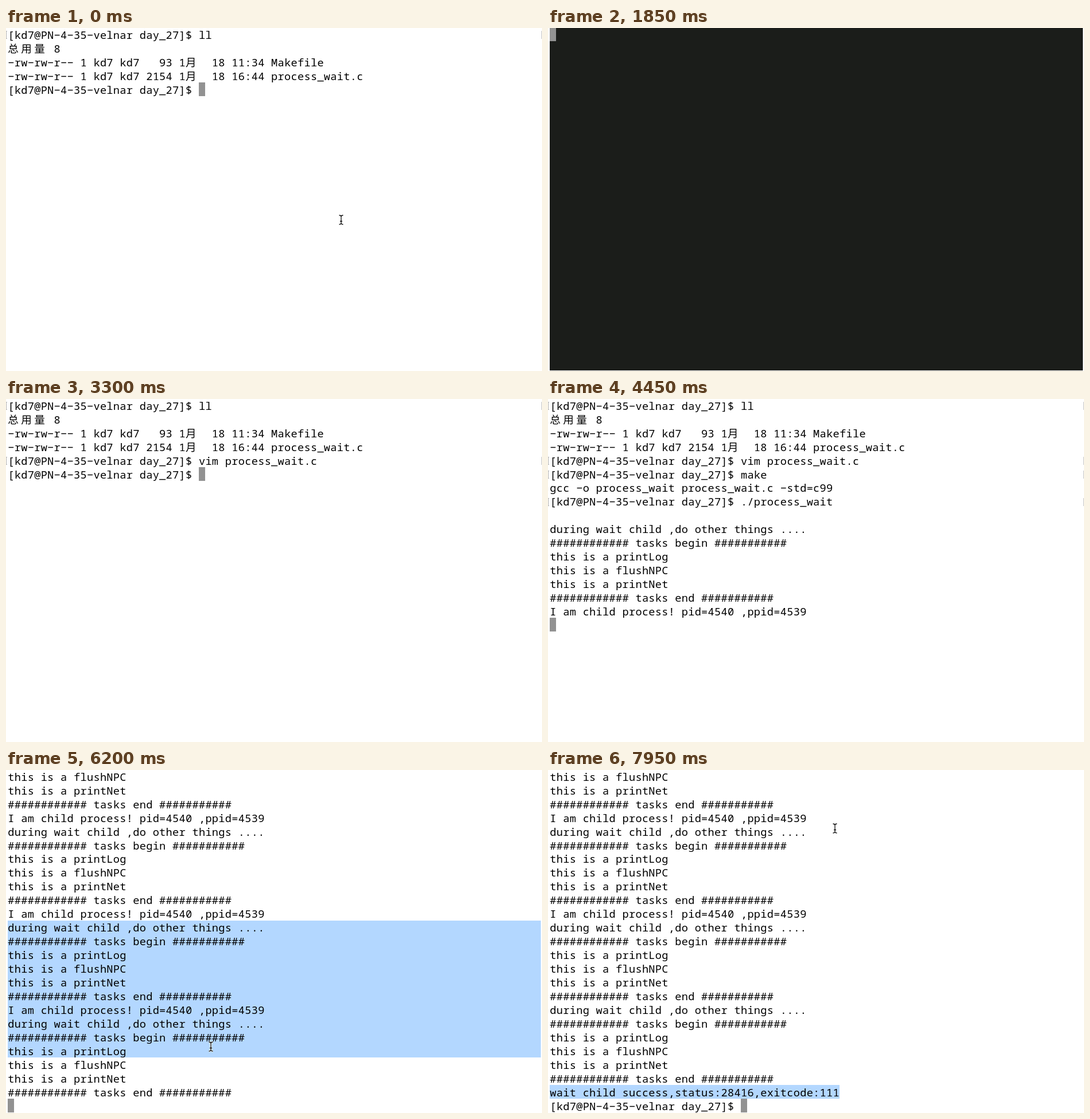
Animation of 934x599 px, one loop 8 s. Source, as an HTML page with a canvas:

```html
<!DOCTYPE html>
<html lang="zh">
<head>
<meta charset="utf-8">
<title>Terminal session</title>
<style>
html, body { margin: 0; width: 100%; height: 100%; overflow: hidden; background: #fff; }
canvas { display: block; }
</style>
</head>
<body>
<canvas id="stage" width="934" height="599"></canvas>
<script>
const ctx = document.getElementById('stage').getContext('2d');
const LOOP = 8000, TICK = 50;
const X0 = 3.3, CW = 11.47, RH = 23.96, COLS = 81, ROWS = 25;
const FONT = '18.6px "Noto Sans Mono", "Noto Sans CJK SC", "Noto Sans CJK", monospace';
const GREY = '#929292', DARK = '#1b1d1a', BLUE = '#6688ff', GREEN = '#66ff66';
const PINK = '#ff5f87', YELLOW = '#dcdc32', TEAL = '#26b3b3', SKY = '#5fafd7',
      LEMON = '#ffff87', COMMENT = '#1edc1e', PLAIN = '#ececec';

const colX = c => X0 + c * CW;
const rowY = r => Math.round(r * RH - 1);
const cells = ch => /[\u3000-\u9fff\uff00-\uffef]/.test(ch) ? 2 : 1;

function fill(color, x0, y0, x1, y1) {
  ctx.fillStyle = color;
  ctx.fillRect(x0, y0, x1 - x0, y1 - y0);
}

function block(color, c0, c1, row) {
  fill(color, Math.round(colX(c0) - .3), Math.max(0, rowY(row)), Math.round(colX(c1) - .3), rowY(row + 1));
}

function put(text, col, row, color, bold) {
  ctx.font = (bold ? '700 ' : '500 ') + FONT;
  ctx.fillStyle = color;
  for (const ch of text) {
    if (ch !== ' ') ctx.fillText(ch === '-' ? '\u2212' : ch, colX(col), row * RH + 18.7);
    col += cells(ch);
  }
}

// Last value whose time has come
function at(t, steps) {
  let value = '';
  for (const [time, v] of steps) if (t >= time) value = v;
  return value;
}

// ---------- editor ----------
const code = String.raw`
#include <stdio.h>
#include <stdlib.h>
#include <unistd.h>
#include <sys/types.h>
#include <sys/wait.h>

#define TASK_NUM 5

typedef void (*task_t)();

task_t tasks[TASK_NUM];

void printLog(){
    printf("this is a printLog\n");
}

void printNet(){
    printf("this is a printNet\n");
}

void flushNPC(){
    printf("this is a flushNPC\n");
}

void initTasks(){
    tasks[0] = printLog;
    tasks[1] = flushNPC;
    tasks[2] = printNet;
    tasks[3] = NULL;
}

void executeTasks(){
    for(int i = 0; tasks[i]; i++){
        tasks[i]();
    }
}

int main(){
    initTasks();
    pid_t id = fork();
    if(id < 0){
        perror("fork error\n");
        return 1;
    }
    else if(id == 0){
        int cnt = 10;
        while(cnt--){
            printf("I am child process! pid=%d ,ppid=%d\n",getpid(),getppid());
            sleep(1);
        }
        exit(111);
    }
    //父进程
    int status = 0;
    while(1){
        pid_t rid = waitpid(id,&status,WNOHANG);//非阻塞等待
        if( 0 == rid ){
            //子进程没有结束，我们父进程可以做一些其他事
            printf("during wait child ,do other things ....\n");
            printf("############ tasks begin ###########\n");
            executeTasks();
            printf("############ tasks end ###########\n");

        }
        else if (rid > 0){
            //进程正常终止
            printf("wait child success,status:%d,exitcode:%d\n",status,WEXITSTATUS(status));
            break;
        }
        else{
            perror("waitpid error\n");
            break;
        }
        sleep(1);
    }

    return 0;
}

//int main(){
//    pid_t id = fork();
//    if(id == 0){
//        exit(1);
//    }
//    int status = 0;
//    wait(&status);
//    return 0;
//}`.slice(1).split('\n');

const TOKEN = /(\/\/.*)|("(?:\\.|[^"])*")|\b(\d+)\b|(#\w+|\b(?:while|for|break|return)\b)|\b(if|else)\b|(\w+)(?=\()|\w+|./g;
const TOKEN_COLORS = [COMMENT, SKY, LEMON, PINK, YELLOW, TEAL];

function colorize(line) {
  const parts = [];
  for (const m of line.matchAll(TOKEN)) {
    const kind = m.slice(1).findIndex(g => g !== undefined);
    if (kind === 1) {
      for (const s of m[0].split(/(\\.|%\w)/)) parts.push([s, /^[\\%]/.test(s) ? PINK : SKY]);
    } else parts.push([m[0], TOKEN_COLORS[kind] || PLAIN]);
  }
  return parts;
}

// Screen rows after wrapping
const viewRows = [];
code.forEach((line, i) => {
  let row = { line: i + 1, first: true, chars: [] }, col = 0;
  viewRows.push(row);
  for (const [text, color] of colorize(line)) for (const ch of text) {
    if (col + cells(ch) > COLS - 4) {
      row = { line: i + 1, first: false, chars: [] };
      viewRows.push(row);
      col = 0;
    }
    row.chars.push([ch, color, col + 4]);
    col += cells(ch);
  }
});

function missingGlyph(col, row) {
  const x = colX(col) + 2.5, y = rowY(row) + 5.5;
  ctx.strokeStyle = BLUE;
  ctx.lineWidth = 2;
  ctx.strokeRect(x, y, 16.5, 17);
  ctx.font = '700 14px "Noto Sans Mono", monospace';
  ctx.fillStyle = BLUE;
  ctx.fillText('?', x + 4.1, y + 13.7);
}

function drawEditor(t) {
  fill(DARK, 3, 0, 932, 598);
  if (t < 1900) return block(GREY, 0, 1, 0);

  const step = Math.floor((Math.min(t, 2800) - 1950) * 69 / 700);
  const cur = Math.max(1, 1 + step);
  const lastLine = Math.min(cur + 5, code.length);
  const end = viewRows.findLastIndex(r => r.line === lastLine);
  const start = Math.max(0, end - 21);

  block(BLUE, 0, 19, 0);
  put('1: process_wait.c', 1, 0, DARK);
  missingGlyph(19, 0);
  missingGlyph(21, 0);
  put('←', 70, 0, GREEN);
  block(GREEN, 71, 80, 0);
  put('buffers', 72, 0, DARK);

  const command = at(t, [[2950, ':'], [3050, ':q']]);
  viewRows.slice(start, start + 22).forEach((r, i) => {
    const y = i + 1, here = r.line === cur;
    if (here) block('#323332', 4, COLS, y);
    if (here && r.first && !command) block(GREY, 4, 5, y);
    if (r.first) put(String(r.line).padStart(3), 0, y, here ? '#87d7ff' : '#8f908a');
    for (const [ch, color, col] of r.chars) put(ch, col, y, color);
  });

  block(BLUE, 0, 8, 23);
  put('NORMAL', 1, 23, DARK, true);
  missingGlyph(8, 23);
  put('process_wait.c', 11, 23, BLUE, true);
  put('main ⇵ c', 47, 23, BLUE);
  missingGlyph(56, 23);
  put('←', 60, 23, BLUE);
  block(BLUE, 61, 80, 23);
  put(Math.floor(cur * 1000 / 96) + '%', 63, 23, DARK);
  put(cur + '88 :', 70, 23, DARK, true);
  put('1', 78, 23, DARK);

  if (command) {
    put(command, 0, 24, PLAIN);
    block(GREY, command.length, command.length + 1, 24);
  }
}

// ---------- shell ----------
const PROMPT = '[kd7@PN-4-35-velnar day_27]$ ';
const CHILD = 'I am child process! pid=4540 ,ppid=4539';
const WORK = [
  'during wait child ,do other things ....',
  '############ tasks begin ###########',
  'this is a printLog', 'this is a flushNPC', 'this is a printNet',
  '############ tasks end ###########'
];

function burst(k) {
  if (k < 3) return [...WORK, CHILD];
  if (k === 3) return [WORK[0], CHILD, ...WORK.slice(1)];
  if (k < 10) return [CHILD, ...WORK];
  return WORK;
}

function shellLines(t) {
  const lines = [];
  const add = (text, mark) => lines.push({ text, mark });
  add(PROMPT + 'll', true);
  add('总用量 8');
  add('-rw-rw-r-- 1 kd7 kd7   93 1月  18 11:34 Makefile');
  add('-rw-rw-r-- 1 kd7 kd7 2154 1月  18 16:44 process_wait.c');
  add(PROMPT + at(t, [[600, 'v'], [650, 'vi'], [700, 'vim'], [800, 'vim '], [1000, 'vim p'],
    [1250, 'vim pr'], [1400, 'vim process_wait.c ']]), t >= 1500);
  if (t >= 3250) {
    add(t < 3300 ? '' : PROMPT + at(t, [[3500, 'm'], [3550, 'ma'], [3600, 'make']]), t >= 3700);
  }
  if (t >= 3700) {
    add('gcc -o process_wait process_wait.c -std=c99');
    add(PROMPT + at(t, [[4000, './p'], [4050, './process_wait ']]), t >= 4150);
  }
  if (t >= 4450) {
    add('');
    const count = Math.floor((t - 4450) / 250) + 1;
    for (let k = 0; k < Math.min(count, 11); k++) burst(k).forEach(s => add(s));
    if (count > 11) add('wait child success,status:28416,exitcode:111');
    add(count > 11 ? PROMPT : '');
  }
  return lines.slice(-ROWS);
}

function promptMark(row) {
  const y = rowY(row) + 6;
  fill('#b4b4b4', 0, y, 1, y + 14);
  fill('#b4b4b4', 0, y, 2, y + 1);
  fill('#b4b4b4', 0, y + 13, 2, y + 14);
  fill('#c4c4c4', 933, y, 934, y + 14);
}

// ---------- pointer ----------
const PATH = [
  [4700, 584, 335], [5200, 43, 393], [5700, 60, 425], [6000, 8, 443], [6200, 357, 483],
  [6400, 400, 488], [6600, 60, 543], [7400, 60, 543], [7600, 5, 563], [7800, 514, 568], [7950, 500, 102]
];

function pointer(t) {
  if (t < 600) return { x: 584, y: 335 };
  if (t < PATH[0][0]) return null;
  const i = Math.min(PATH.findLastIndex(p => t >= p[0]), PATH.length - 2);
  const [t0, x0, y0] = PATH[i], [t1, x1, y1] = PATH[i + 1];
  const u = (t - t0) / (t1 - t0), e = u * u * (3 - 2 * u);
  return { x: x0 + (x1 - x0) * e, y: y0 + (y1 - y0) * e };
}

function drawPointer({ x, y }) {
  const beam = new Path2D('M-3.5 -8Q-.5 -8 0 -6Q.5 -8 3.5 -8M0 -6V6M-3.5 8Q-.5 8 0 6Q.5 8 3.5 8M-2 2.5H2');
  ctx.save();
  ctx.translate(x, y);
  for (const [color, width] of [['#fff', 3], ['#111', 1.3]]) {
    ctx.strokeStyle = color;
    ctx.lineWidth = width;
    ctx.stroke(beam);
  }
  ctx.restore();
}

function drawSelection(t, mouse) {
  const color = '#b3d7ff';
  if (t >= 6000 && t < 6550) {
    const first = at(t, [[6000, 18], [6200, 11], [6450, 4]]);
    const last = t < 6450 ? Math.floor((mouse.y + 1) / RH) : 13;
    fill(color, 3, rowY(first), 932, rowY(last + 1));
  }
  if (t >= 7600) {
    const cols = t < 7800 ? Math.min(44, Math.round((mouse.x - X0) / CW)) : 44;
    if (cols > 0) block(color, 0, cols, 23);
  }
}

function drawShell(t) {
  const mouse = pointer(t), lines = shellLines(t);
  drawSelection(t, mouse);
  const row = lines.length - 1, col = lines[row].text.length;
  block(GREY, col, col + 1, row);
  lines.forEach((line, i) => {
    put(line.text, 0, i, '#000');
    if (line.mark) promptMark(i);
  });
  if (mouse) drawPointer(mouse);
}

// ---------- loop ----------
let shown = -1;
function frame() {
  const t = Math.floor(performance.now() % LOOP / TICK) * TICK;
  if (t !== shown) {
    shown = t;
    fill('#fff', 0, 0, 934, 599);
    if (t >= 1800 && t < 3250) drawEditor(t);
    else drawShell(t);
  }
  requestAnimationFrame(frame);
}
frame();
</script>
</body>
</html>
```
